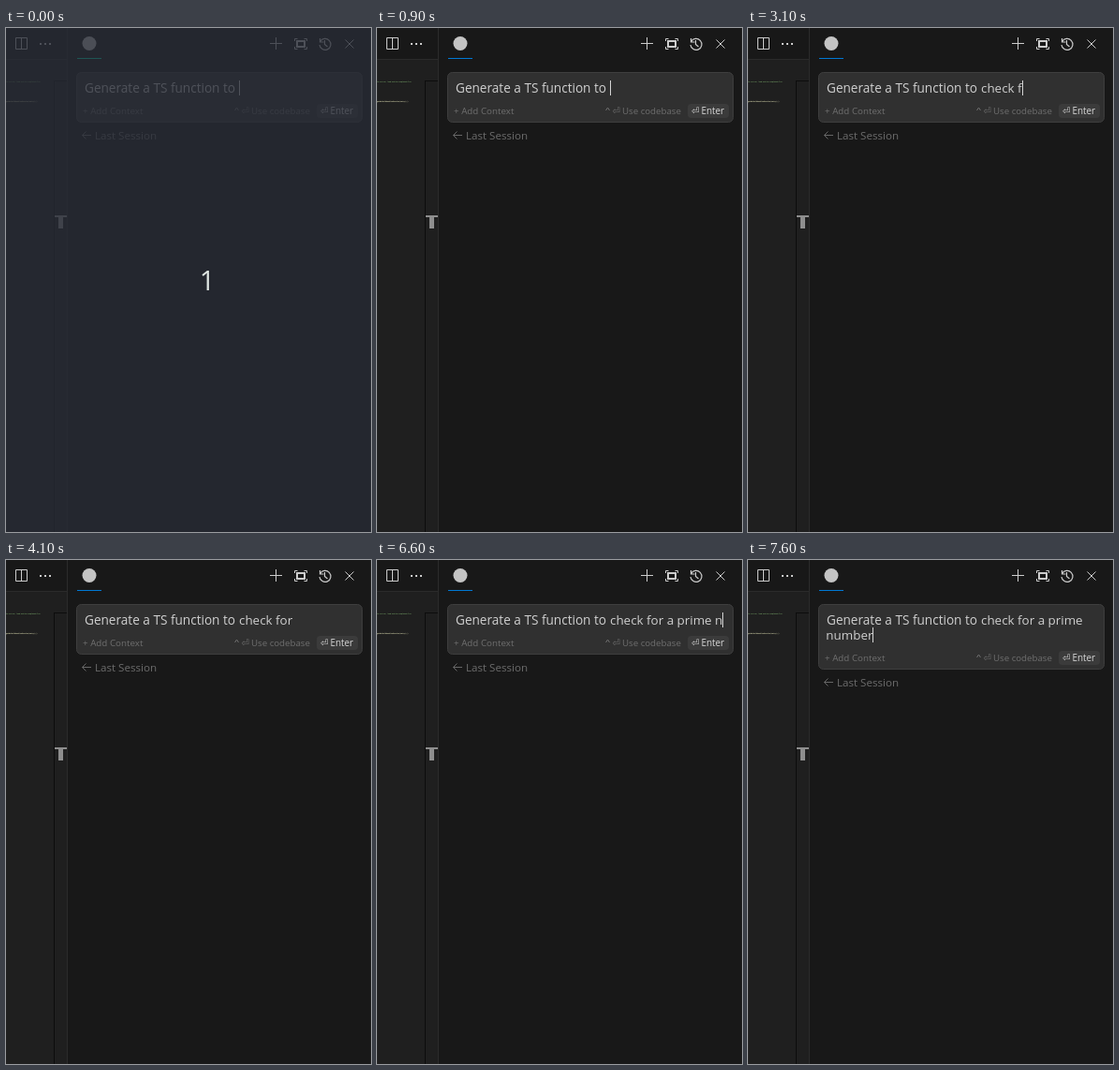
An HTML page with a canvas that plays this animation: 390x538 px, repeating every 8 s.

```html
<!DOCTYPE html>
<html lang="en">
<head>
<meta charset="utf-8">
<title>Typing a prompt</title>
<style>
  html, body { margin: 0; width: 100%; height: 100%; overflow: hidden; background: #181818; }
  canvas { display: block; }
</style>
</head>
<body>
<canvas id="stage" width="390" height="538"></canvas>
<script>
const ctx = document.getElementById('stage').getContext('2d');
const LOOP = 8000;
const SANS = '"Open Sans", "Noto Sans", sans-serif';
const PROMPT = 'Generate a TS function to ';
const TYPED = 'check for a prime number';
// One key press time for each character of TYPED
const KEYS = [2100, 2300, 2400, 2600, 2800, 2900, 3100, 3300, 3400, 3500, 4900, 5000,
  5200, 5300, 5600, 5800, 6000, 6400, 6600, 6900, 7100, 7400, 7500, 7600];
const CARET_OFF = [[300, 900], [1500, 2100], [4100, 4700]];
const WRAP_TIME = 6900;

function rect(x, y, w, h, color) {
  ctx.fillStyle = color;
  ctx.fillRect(x, y, w, h);
}

function rounded(x, y, w, h, r, fill, stroke) {
  ctx.beginPath();
  ctx.roundRect(x, y, w, h, r);
  ctx.fillStyle = fill;
  ctx.fill();
  if (stroke) {
    ctx.strokeStyle = stroke;
    ctx.lineWidth = 1;
    ctx.stroke();
  }
}

function line(path, color = '#cccccc', width = 1) {
  ctx.strokeStyle = color;
  ctx.lineWidth = width;
  ctx.stroke(new Path2D(path));
}

function text(str, x, y, size, color, family = SANS, weight = 400) {
  ctx.font = `${weight} ${size}px ${family}`;
  ctx.fillStyle = color;
  ctx.fillText(str, x, y);
  return x + ctx.measureText(str).width;
}

function drawEditor() {
  rect(0, 0, 390, 538, '#181818');
  rect(0, 34, 65, 504, '#1f1f1f');
  rect(0, 33, 65, 1, '#2b2b2b');
  rect(65, 0, 1, 538, '#2b2b2b');
  rect(51, 56, 1, 482, '#0c0c0c');
  rect(51, 56, 14, 1, '#0c0c0c');
  const mono = '"DejaVu Sans Mono", monospace';
  text('is not set, load and the completed flow', 0, 57.5, 1.55, '#83b872', mono, 700);
  text('getDefaultNameFromSession(entry); }', 0, 79.2, 1.6, '#f0f0c0', mono, 700);
  rect(52, 200, 13, 2, '#8e8e8e');
  rect(56, 202, 5, 12, '#8e8e8e');
}

function drawToolbar() {
  line('M10.5 10.5h12v12h-12zM16.5 10.5v12');
  for (const x of [36, 41, 46]) rect(x, 16, 2, 2, '#cccccc');
  ctx.beginPath();
  ctx.arc(89, 16.5, 7.5, 0, Math.PI * 2);
  ctx.fillStyle = '#c4c4c4';
  ctx.fill();
  rect(76, 32, 26, 1, '#0078d4');
  line('M282 16.5h13M288.5 10v13');
  line('M308.5 14v-2.5h3M318.5 11.5h3v2.5M321.5 20v2.5h-3M311.5 22.5h-3v-2.5');
  line('M311 14h8v6h-8z', '#cccccc', 2);
  line('M335.5 11v4h4M335.7 14.5A6 6 0 1 1 335 18M340.5 13v4.5l3 2.5', '#cccccc', 1.2);
  line('M362.5 12.5l9 9M371.5 12.5l-9 9');
}

function drawPrompt(t) {
  const wrapped = t >= WRAP_TIME;
  const shift = wrapped ? 16 : 0;
  const typed = TYPED.slice(0, KEYS.filter(key => key <= t).length);
  const split = wrapped ? TYPED.indexOf('number') : typed.length;
  const ink = '#d0d0d0';

  rounded(75.5, 47.5, 305, 53 + shift, 5, '#303030', '#3e3e3e');
  text(PROMPT, 84, 69, 13.6, ink);
  let caretX = text(typed.slice(0, split), 249, 69, 13.42, ink);
  if (wrapped) caretX = text(typed.slice(split), 83.3, 85, 13.42, ink);
  if (!CARET_OFF.some(([from, to]) => t >= from && t < to)) {
    rect(Math.round(caretX), 56 + shift, 1, 16, '#d4d4d4');
  }

  ctx.save();
  ctx.translate(0, shift);
  const dim = '#6f6f6f';
  const symbols = '"DejaVu Sans", sans-serif';
  text('+ Add Context', 82, 92, 9.8, dim);
  line('M244.5 88l2-3 2 3', dim);
  text('⏎', 251.5, 92, 10, dim, symbols);
  text('Use codebase', 262, 92, 9.7, dim);
  rounded(332, 81, 44, 15, 4, '#3b3b3b');
  text('⏎', 336, 92, 10, '#d8d8d8', symbols);
  text('Enter', 346.5, 92, 9.9, '#d8d8d8');
  line('M91 114.5h-9.5M85.5 110.5l-4 4 4 4', '#666666');
  text('Last Session', 95, 119, 11.6, '#6c6c6c');
  ctx.restore();
}

function drawCountdown() {
  rect(0, 0, 390, 538, 'rgba(40, 44, 54, 0.77)');
  rect(76, 32, 26, 1, '#1f5553');
  ctx.textAlign = 'center';
  text('1', 215, 280, 29, '#dfe6e3');
  ctx.textAlign = 'left';
}

function frame() {
  const t = performance.now() % LOOP;
  drawEditor();
  drawToolbar();
  drawPrompt(t);
  if (t < 100) drawCountdown();
  requestAnimationFrame(frame);
}
frame();
</script>
</body>
</html>
```
